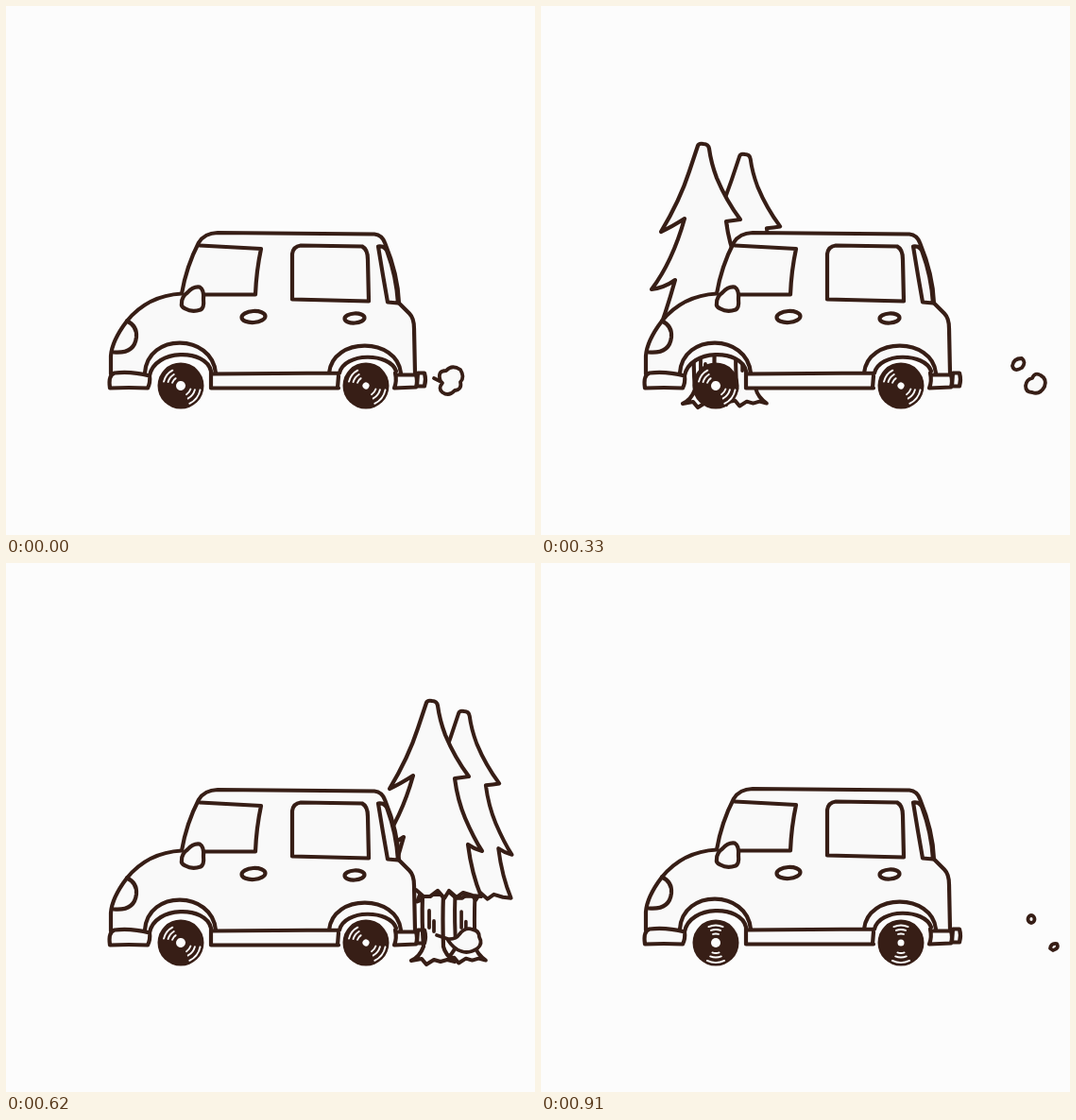
These frames come from a looping animation (560 by 560 pixels, 1 s). An HTML page with a canvas:

```html
<!DOCTYPE html>
<html lang="en">
<head>
<meta charset="utf-8">
<title>Little car</title>
<style>
html, body { margin: 0; width: 100%; height: 100%; overflow: hidden; background: #fcfcfc; }
canvas { display: block; width: 560px; height: 560px; }
</style>
</head>
<body>
<canvas id="stage" width="560" height="560"></canvas>
<script>
const ctx = document.getElementById('stage').getContext('2d');
const INK = '#371e16', PAPER = '#fcfcfc', FILL = '#f9f9f9';
const LOOP = 1000;
const STARTS = [0, 120, 200, 330, 410, 500, 620, 700, 830, 910];

// One entry per drawn pose
const BOB = [0, -1, 1, 0, -1, 1, 0, -1, 0, -1];
const DIAG = 0.66, FLAT = 0, UP = Math.PI / 2;
const SPIN = [DIAG, FLAT, UP, DIAG, FLAT, UP, DIAG, FLAT, DIAG, UP];
// Tree tips: front x, back x, lift
const TREES = {
  2: [62, 111, -5], 3: [171, 215, 0], 4: [267, 308, 0],
  5: [360, 398, 0], 6: [450, 484, 0]
};

const path = d => new Path2D(d);

// Tree, relative to its tip
const crown = path(`M-5 2 Q-4 -1 1 0 Q6 0 7 5 Q9 20 15 36 Q25 60 40 80 Q33 81 25 82
  Q28 105 36 124 Q45 145 54 159 Q46 157 39 152 Q43 183 53 207 L44 206 L34 203 L27 208
  L19 201 L14 209 L7 201 L-1 207 L-8 207 L-16 200 Q-32 203 -51 211 Q-39 180 -29 144
  Q-40 152 -54 154 Q-32 125 -19 79 Q-33 88 -44 93 Q-24 60 -14 29 Z`);
const trunk = path(`M-9 205 Q-10 235 -8 260 Q-12 271 -21 275 L-10 273 L-5 279 L3 274
  L10 276 L17 274 L25 276 Q15 269 13 260 Q12 230 13 205 Z`);
const bark = path('M-2 222 V240 M3 233 V244');

// Car
const body = `M111 389 L111 370 Q112 354 128 333 Q150 306 186 304 Q191 275 204 250
  Q210 240 224 239.5 L390 241 Q398 242 401 250 Q415 284 416 314 L427 325 Q432 330 432 341
  L433 388`;
const shell = path(body + ` L434 403 L411 404 L413 386 C406 366 358 366 353 388
  L351 404 L217 404 L217 386 C212 362 157 362 152 391 L150 404 L110 404 Z`);
const outline = path(body);
const details = path(`M128 333 Q139 338 138 350 Q136 368 114 366
  M110 404 Q108 390 115 388 Q133 386 152 391 Q153 398 150 404 Q130 403 110 404 Z
  M147 388 C150 345 218 346 222 388
  M152 391 C157 362 212 362 217 386 L217 404
  M342 388 C346 349 414 350 418 388
  M353 388 C358 366 406 366 413 386
  M218 389 L352 388 M217 404 L352 404 M352 391 L351 404
  M413 390 L434 390 Q436 397 434 403 L411 404 Q414 397 412 388
  M436 388 H443 Q445 395 443 402 L435 402 Z
  M205 253 L270 256.5 Q265 280 264 305 L207 305
  M303 262 Q304 254 312 253 L377 254 Q383 257 383 268 L384 312 L303 310 Z
  M394 254 Q402 253 404 261 Q413 285 415 314 L404 313 Q399 285 394 254 Z`);
const mirror = path(`M186 314 Q186 307 192 303 Q198 296 205 297 Q210 300 209 310
  Q210 319 206 321 Q197 324 190 320 Q185 318 186 314 Z`);

// Exhaust, five stages
const PUFFS = [
  path(`M453 394 L459 397 M460 397 Q456 386 466 386 Q472 379 481 385 Q486 393 481 398
    Q483 406 475 407 Q469 414 462 409 Q457 405 462 399 Z`),
  path(`M456 394 L468 398 M467 398 Q476 399 480 393 Q486 385 494 388 Q501 389 501 396
    Q505 403 499 408 Q490 414 482 411 Q474 409 467 398 Z`),
  path(`M461 398.5 L488 400.5 L503 404 M488 400.5 Q500 402 504 396 Q506 390 513 390
    Q520 386 524 392 Q529 396 526 401 Q531 405 528 411 Q523 416 515 414 Q508 413 506 408 L502 403
    M482 385 a6 5.5 0 1 0 12 0 a6 5.5 0 1 0 -12 0`),
  path(`M499 381 Q500 373 509 373 Q514 377 509 383 Q501 388 499 381 Z
    M513 402 Q514 395 520 394 Q523 387 529 391 Q536 395 533 403 Q528 412 520 409 Q513 409 513 402 Z`),
  path(`M515.5 377 a3.5 4 0 1 0 7 0 a3.5 4 0 1 0 -7 0
    M539 408 Q540 402 546 403 Q549 408 542 410 Z`)
];

function draw(p, width = 4.2, fill = FILL) {
  if (fill) {
    ctx.fillStyle = fill;
    ctx.fill(p);
  }
  ctx.strokeStyle = INK;
  ctx.lineWidth = width;
  ctx.stroke(p);
}

function tree(x, y, scale) {
  ctx.save();
  ctx.translate(x, y);
  ctx.scale(scale, scale);
  draw(trunk);
  draw(bark, 3.8, null);
  draw(crown);
  ctx.restore();
}

function handle(x, y, rx, ry) {
  const p = new Path2D();
  p.ellipse(x, y, rx, ry, -0.06, 0, 7);
  draw(p);
}

function car(dy) {
  ctx.save();
  ctx.translate(0, dy + 0.5);
  ctx.fillStyle = FILL;
  ctx.fill(shell);
  draw(outline, 4.2, null);
  draw(details, 4.2, null);
  draw(mirror);
  handle(262, 328.5, 12.5, 6);
  handle(369, 330, 10.5, 5);
  ctx.restore();
}

function disc(r, color) {
  ctx.fillStyle = color;
  ctx.beginPath();
  ctx.arc(0, 0, r, 0, 7);
  ctx.fill();
}

// Short bright grooves on one side of a wheel
function grooves(side, radii) {
  for (const r of radii) {
    const half = 0.2 + r * 0.012;
    ctx.beginPath();
    ctx.arc(0, 0, r, side - half, side + half);
    ctx.stroke();
  }
}

function wheel(x, angle, hub) {
  ctx.save();
  ctx.translate(x, 402);
  disc(24.5, INK);
  ctx.rotate(angle);
  ctx.strokeStyle = PAPER;
  ctx.lineWidth = 1.9;
  grooves(0, [11, 15.5, 21]);
  grooves(Math.PI, [9.5, 14, 18.5]);
  disc(hub, PAPER);
  ctx.restore();
}

function render(time) {
  const t = time % LOOP;
  const pose = STARTS.filter(s => s <= t).length - 1;
  ctx.fillStyle = PAPER;
  ctx.fillRect(0, 0, 560, 560);
  ctx.lineCap = ctx.lineJoin = 'round';
  const trees = TREES[pose];
  if (trees) {
    const [front, back, lift] = trees;
    tree(back, 157 + lift, 0.955);
    tree(front, 146 + lift, 1);
  }
  car(BOB[pose]);
  wheel(185, SPIN[pose], 5);
  wheel(381, SPIN[pose], 3.5);
  draw(PUFFS[pose % PUFFS.length], 3.8);
}

const begin = performance.now();
function tick() {
  render(performance.now() - begin);
  requestAnimationFrame(tick);
}
tick();
</script>
</body>
</html>
```
